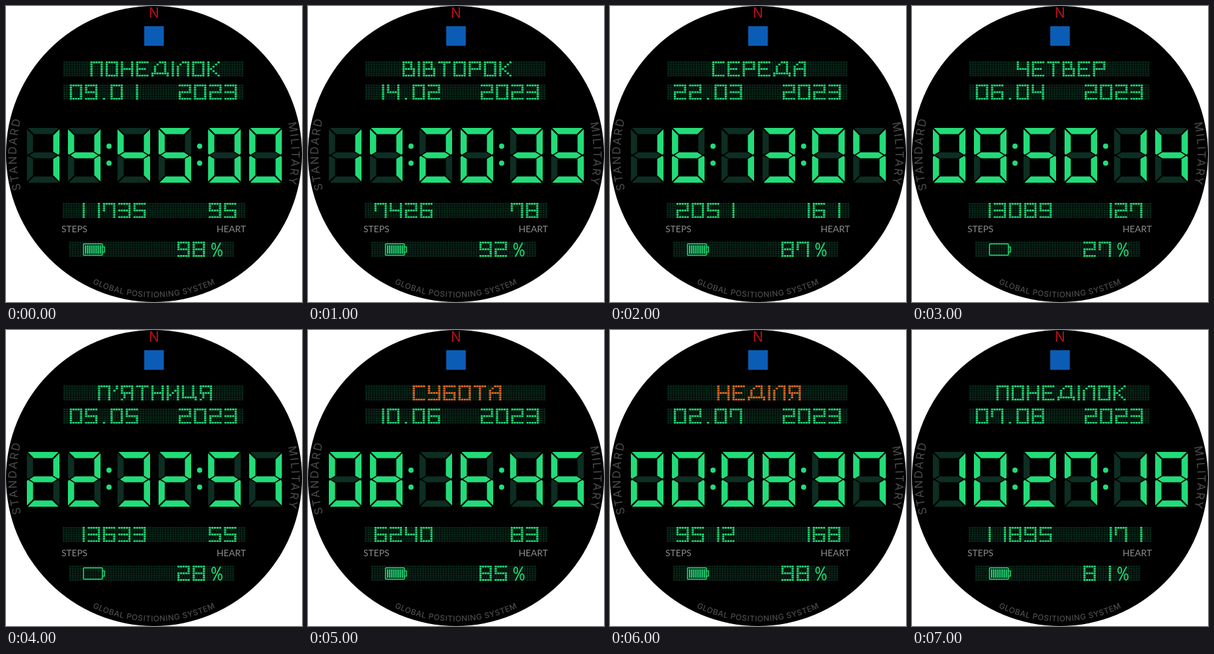
Recreate the animation shown at these times as an HTML page. Size 454 px wide and 454 px high, loop 8 s.

```html
<!DOCTYPE html>
<html lang="uk">
<head>
<meta charset="utf-8">
<title>Watch face</title>
<style>
  html, body { margin: 0; width: 100%; height: 100%; overflow: hidden; background: #fff; }
  svg { display: block; width: 454px; height: 454px; }
  .lit { fill: #22dc78; }
  .holiday { fill: #f5691c; }
  .ghost { fill: #0d2e22; }
  .label { font: 14px Lato, sans-serif; fill: #8c8c8c; }
  .rim { font: 17px Inter, sans-serif; fill: #4c4c4c; text-anchor: middle; letter-spacing: 2.4px; }
  .rim.small { font-size: 12px; font-weight: 500; letter-spacing: .5px; }
  .north { font: 21px Inter, sans-serif; fill: #b30f14; text-anchor: middle; }
  .line { fill: none; stroke: #22dc78; }
  .scene { visibility: hidden; animation: show 8s step-end infinite; }
  @keyframes show {
    0% { visibility: visible; }
    12.5%, 100% { visibility: hidden; }
  }
</style>
</head>
<body>
<svg viewBox="0 0 454 454">
  <defs>
    <path id="rimTop" d="M227 438A211 211 0 0 1 227 16"/>
    <path id="rimRight" d="M227 16A211 211 0 0 1 227 438"/>
    <path id="rimBottom" d="M7 227A220 220 0 0 0 447 227"/>
  </defs>
  <circle cx="227" cy="227" r="227"/>
  <text class="north" x="227" y="18">N</text>
  <rect x="212" y="31" width="30" height="30" fill="#0b5cb5"/>
  <text class="rim"><textPath href="#rimTop" startOffset="50%">STANDARD</textPath></text>
  <text class="rim"><textPath href="#rimRight" startOffset="50%">MILITARY</textPath></text>
  <text class="rim small"><textPath href="#rimBottom" startOffset="50%">GLOBAL POSITIONING SYSTEM</textPath></text>
  <text class="label" x="85" y="347">STEPS</text>
  <text class="label" x="368" y="347" text-anchor="end">HEART</text>
  <g class="lit">
    <circle cx="158" cy="215" r="4"/><circle cx="158" cy="241" r="4"/>
    <circle cx="297" cy="215" r="4"/><circle cx="297" cy="241" r="4"/>
  </g>
  <g id="back"></g>
  <g class="line" stroke-width="1.5">
    <rect x="118.8" y="364.8" width="29" height="17.5" rx="1"/>
    <path d="M148 369.5h3v8h-3"/>
  </g>
  <g class="line" stroke-width="1.7">
    <ellipse cx="318.6" cy="368.5" rx="2.8" ry="4.7"/>
    <ellipse cx="328.4" cy="378.8" rx="2.8" ry="4.7"/>
    <path d="M329 363L318 384.5"/>
  </g>
  <g id="scenes"></g>
</svg>
<script>
  const COL = 3.9, ROW = 3.4;
  const DIGITS = ['abcdef', 'bc', 'abged', 'abgcd', 'fgbc', 'afgcd', 'afgedc', 'fabc', 'abcdefg', 'abcdfg'];

  // Dot strokes on a grid of 7 rows, each point written as column and row.
  const STROKES = { a: '00 40', b: '40 43', c: '43 46', d: '06 46', e: '03 06', f: '00 03', g: '03 43' };
  const LETTERS = {
    'П': '06 00 40 46', 'О': '00 40 46 06 00', 'Н': '00 06,03 43,40 46',
    'Е': '40 00 06 46,03 33', 'Д': '06 05 65 66,15 12 30 50 55', 'І': '00 06',
    'Л': '06 02 20 40 46', 'К': '00 06,03 13 40,13 46', 'В': '00 06 46 43 03,00 30 33',
    'Т': '00 40,20 26', 'Р': '06 00 40 43 03', 'С': '40 00 06 46',
    'У': '00 03 43,40 46 06', 'Б': '40 00 06 46 43 03', 'А': '06 02 20 40 46,03 43',
    'Ч': '00 03 43,40 46', 'Я': '46 40 00 03 43,23 06', 'И': '00 06,05 41,40 46',
    'Ц': '00 05 55 56,40 45', "'": '10 11 02', '.': '16'
  };
  const WIDTHS = { 'Д': 7, 'Ц': 6, 'І': 1, "'": 2, '.': 3 };

  const width = ch => WIDTHS[ch] || 5;
  const strokes = ch => LETTERS[ch] || [...DIGITS[ch]].map(s => STROKES[s]).join();

  function dots(ch) {
    const set = new Set();
    for (const stroke of strokes(ch).split(',')) {
      const pts = stroke.split(' ').map(p => [+p[0], +p[1]]);
      pts.forEach(([x, y], i) => {
        const [u, v] = pts[i + 1] || [x, y];
        const n = Math.max(Math.abs(u - x), Math.abs(v - y), 1);
        for (let k = 0; k <= n; k++)
          set.add(Math.round(x + (u - x) * k / n) + ' ' + Math.round(y + (v - y) * k / n));
      });
    }
    return [...set].map(s => s.split(' ').map(Number));
  }

  const dot = (x, y) => `M${x.toFixed(2)} ${y.toFixed(2)}h3.1v2.7h-3.1z`;

  function matrix(text, x, y, cls = 'lit') {
    let d = '';
    for (const ch of text) {
      for (const [c, r] of dots(ch)) d += dot(x + c * COL, y + r * ROW);
      x += (width(ch) + 1) * COL;
    }
    return `<path class="${cls}" d="${d}"/>`;
  }

  const span = text => ([...text].reduce((w, ch) => w + width(ch) + 1, -1)) * COL;

  function band(x, y, w) {
    let d = '';
    for (let c = 0; (c + 1) * COL <= w + 1; c++)
      for (let r = 0; r < 7; r++) d += dot(x + c * COL, y + r * ROW);
    return `<path fill="#08281a" d="${d}"/>`;
  }

  // Large seven-segment digits, 50 by 84.
  const CELLS = [32, 95, 171, 234, 310, 373];
  const BAR = [[1.5, 0], [48.5, 0], [39, 9.5], [11, 9.5]];
  const SIDE = [[0, 2], [9.5, 11.5], [9.5, 36.5], [2, 41], [0, 39.5]];
  const MID = [[4, 42], [11, 37.4], [39, 37.4], [46, 42], [39, 46.6], [11, 46.6]];
  const flip = (pts, fx, fy) => pts.map(([x, y]) => [fx ? 50 - x : x, fy ? 84 - y : y]);
  const SEGMENTS = {
    a: BAR, d: flip(BAR, 0, 1), g: MID,
    f: SIDE, b: flip(SIDE, 1, 0), e: flip(SIDE, 0, 1), c: flip(SIDE, 1, 1)
  };
  const digit = (n, i, cls) => `<path class="${cls}" transform="translate(${CELLS[i]} 187)" d="` +
    [...DIGITS[n]].map(s => 'M' + SEGMENTS[s].join('L') + 'z').join('') + '"/>';
  const clock = (time, cls) => [...time].map((n, i) => digit(n, i, cls)).join('');

  function battery(level) {
    if (level < 30) return '';
    let d = '';
    for (let i = 0; i < 9; i++) d += `M${121 + i * 2.9} 367h1.9v13h-1.9z`;
    return `<path class="lit" d="${d}"/>`;
  }

  // day, date, time, steps, heart, battery
  const SCENES = [
    ['ПОНЕДІЛОК', '09.01', '144500', '11735', '95', '98'],
    ['ВІВТОРОК', '14.02', '172039', '7426', '78', '92'],
    ['СЕРЕДА', '22.03', '161304', '2051', '161', '87'],
    ['ЧЕТВЕР', '06.04', '095014', '13089', '127', '27'],
    ["П'ЯТНИЦЯ", '05.05', '223254', '13633', '55', '28'],
    ['СУБОТА', '10.06', '081645', '6240', '83', '85'],
    ['НЕДІЛЯ', '02.07', '000837', '9512', '168', '98'],
    ['ПОНЕДІЛОК', '07.08', '102717', '11895', '171', '81']
  ];
  SCENES[7][2] = '102718';

  const scene = ([day, date, time, steps, heart, level], i) =>
    `<g class="scene" style="animation-delay:${i ? i - 8 : 0}s">` +
    matrix(day, 229 - span(day) / 2, 85, i === 5 || i === 6 ? 'holiday' : 'lit') +
    matrix(date, 98, 120.5) +
    clock(time, 'lit') +
    matrix(steps, 102, 302) +
    matrix(heart, 354 - span(heart), 302) +
    matrix(level, 263, 361.6) +
    battery(+level) + '</g>';

  document.getElementById('back').innerHTML =
    band(88, 85, 276) + band(88, 120.5, 276) + band(87, 302, 281) + band(97, 361.6, 256) +
    clock('888888', 'ghost') + matrix('2023', 265, 120.5);
  document.getElementById('scenes').innerHTML = SCENES.map(scene).join('');
</script>
</body>
</html>
```
